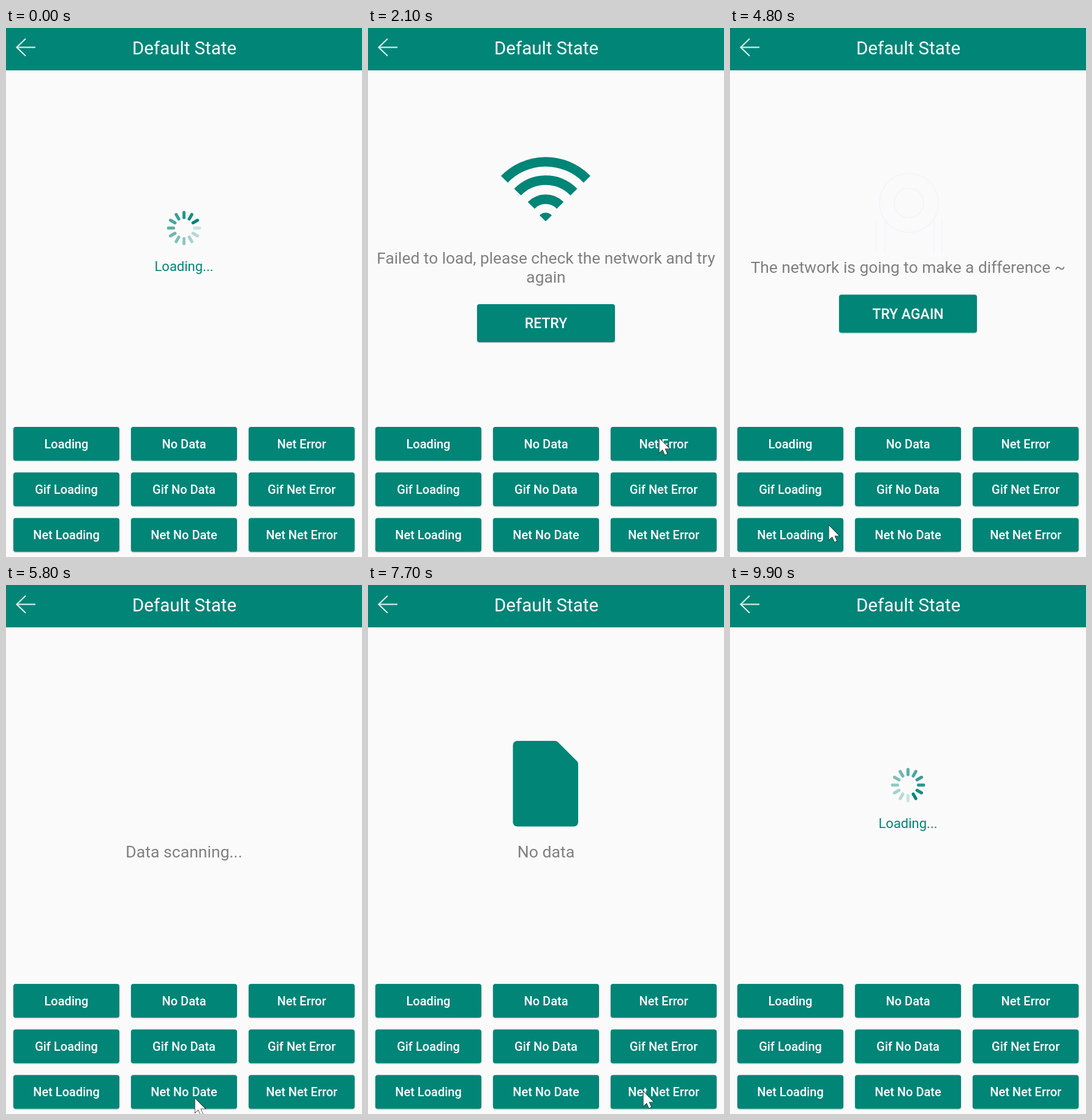
An HTML page with a canvas that plays this animation: 581x862 px, repeating every 10000 ms.

```html
<!DOCTYPE html>
<html lang="en">
<head>
<meta charset="utf-8">
<title>Default State</title>
<style>
html, body { margin: 0; width: 100%; height: 100%; overflow: hidden; background: #fafafa; }
canvas { display: block; }
</style>
</head>
<body>
<canvas id="stage" width="581" height="862"></canvas>
<script>
const ctx = document.getElementById('stage').getContext('2d');
const LOOP = 10000, STEP = 100, CX = 290.5;
const TEAL = '#008577', GRAY = '#808080';

const labels = ['Loading', 'No Data', 'Net Error', 'Gif Loading', 'Gif No Data',
  'Gif Net Error', 'Net Loading', 'Net No Date', 'Net Net Error'];

// The pointer reaches (x, y) at `arrive`, presses at `press`, then the screen changes
const entry = { arrive: 300, press: 300, x: 393, y: 672 };
const presses = [
  { arrive: 700, press: 700, x: 100, y: 670, screen: loading },
  { arrive: 1200, press: 1200, x: 300, y: 670, screen: noData },
  { arrive: 1700, press: 1700, x: 476, y: 668, screen: netError },
  { arrive: 2700, press: 2700, x: 110, y: 758, screen: gifLoading },
  { arrive: 3300, press: 3300, x: 304, y: 747, screen: gifNoData },
  { arrive: 4000, press: 4400, x: 468, y: 745, screen: gifNetError },
  { arrive: 4800, press: 4800, x: 162, y: 810, screen: scanning },
  { arrive: 5800, press: 6500, x: 309, y: 836, screen: noData },
  { arrive: 7700, press: 7900, x: 450, y: 825, screen: netError },
  { arrive: 8800, press: 9000, x: 320, y: 480, screen: loading }
];
const exit = { arrive: 9700, press: 9700, x: 585, y: 498 };
const stops = [entry, ...presses, exit];
const TRAVEL = 600, RESPONSE = 200, RIPPLE = 400;

function text(str, x, y, size, color = GRAY, weight = 400) {
  ctx.font = `${weight} ${size}px Roboto, sans-serif`;
  ctx.textAlign = 'center';
  ctx.fillStyle = color;
  ctx.fillText(str, x, y);
}

function disc(x, y, r, color) {
  ctx.fillStyle = color;
  ctx.beginPath();
  ctx.arc(x, y, r, 0, 2 * Math.PI);
  ctx.fill();
}

function arc(x, y, r, from, to, width, color) {
  ctx.beginPath();
  ctx.arc(x, y, r, from, to);
  ctx.lineWidth = width;
  ctx.strokeStyle = color;
  ctx.stroke();
}

function line(points, width, color) {
  ctx.beginPath();
  points.forEach(([x, y]) => ctx.lineTo(x, y));
  ctx.lineWidth = width;
  ctx.strokeStyle = color;
  ctx.stroke();
}

function button(label, x, y, w, h, size, index, t) {
  ctx.save();
  ctx.beginPath();
  ctx.roundRect(x, y, w, h, 4);
  ctx.shadowColor = 'rgba(0,0,0,.25)';
  ctx.shadowBlur = 2;
  ctx.shadowOffsetY = 1;
  ctx.fillStyle = TEAL;
  ctx.fill();
  ctx.shadowColor = 'transparent';
  const p = (t - presses[index].press) / RIPPLE;
  if (p > 0 && p < 1) {
    ctx.clip();
    disc(x + w / 2, y + h / 2, w * 0.6 * Math.min(1, p * 2), `rgba(255,255,255,${0.22 * (1 - p)})`);
  }
  ctx.restore();
  text(label, x + w / 2, Math.round(y + h / 2 + size * 0.36), size, '#fff', 500);
}

function loading(t) {
  const head = t < LOOP / 2 ? 60 + 0.6 * t : 150 + 0.6 * (t - 9900);
  ctx.save();
  ctx.translate(CX, 326);
  ctx.rotate(head * Math.PI / 180);
  ctx.lineCap = 'round';
  for (let i = 0; i < 12; i++) {
    ctx.globalAlpha = 1 - 0.8 * i / 11;
    line([[0, -17], [0, -25.5]], 5, TEAL);
    ctx.rotate(-Math.PI / 6);
  }
  ctx.restore();
  text('Loading...', CX, 396, 22, TEAL);
}

function noData() {
  const left = 236.5, right = 343, top = 254, bottom = 393.5, fold = 35;
  ctx.fillStyle = TEAL;
  ctx.beginPath();
  ctx.moveTo(CX, top);
  ctx.arcTo(right - fold, top, right, top + fold, 6);
  ctx.arcTo(right, top + fold, right, bottom, 6);
  ctx.arcTo(right, bottom, left, bottom, 7);
  ctx.arcTo(left, bottom, left, top, 7);
  ctx.arcTo(left, top, CX, top, 7);
  ctx.fill();
  text('No data', CX, 444, 26.6);
}

function netError(t) {
  const up = -Math.PI / 2, half = 0.8;
  for (const r of [94, 64, 33]) arc(290, 312, r, up - half, up + half, 15.5, TEAL);
  arc(290, 315, 7, up - half, up + half, 14, TEAL);
  text('Failed to load, please check the network and try', CX, 384, 26.3);
  text('again', CX, 415, 26.3);
  button('RETRY', 178, 450, 225, 62, 23, 9, t);
}

function gifLoading(t) {
  const shift = 30 * Math.sin(2 * Math.PI * (t - 3324) / 1000);
  disc(291 - shift, 323, 30, '#b5c5fb');
  disc(291 + shift, 323, 30, '#e1e7fa');
  text('Loading hard...', CX, 444, 26.6);
}

function gifNoData() {
  text('There is no data ~', CX, 444, 26.3);
}

function gifNetError(t) {
  const faint = '#f3f5fb';
  for (const r of [24, 48]) arc(292, 285, r, 0, 2 * Math.PI, 2, faint);
  for (const x of [239, 253, 333, 346]) line([[x, 312], [x, 366]], 1.5, faint);
  text('The network is going to make a difference ~', CX, 399, 26.3);
  button('TRY AGAIN', 178, 434.5, 225, 62, 23, 9, t);
}

function scanning() {
  text('Data scanning...', CX, 444, 26.6);
}

function drawPointer(t) {
  const i = stops.findIndex(stop => stop.press > t);
  if (i < 1) return;
  const from = stops[i - 1], to = stops[i];
  const depart = Math.max(from.press + 100, to.arrive - TRAVEL);
  const p = Math.min(1, Math.max(0, (t - depart) / (to.arrive - depart)));
  ctx.save();
  ctx.translate(from.x + (to.x - from.x) * p - 0.5, from.y + (to.y - from.y) * p + 0.5);
  ctx.scale(1.42, 1.42);
  ctx.fillStyle = '#fff';
  line([[0, 0], [0, 16.5], [3.8, 13], [6.4, 19], [9, 17.8], [6.4, 12], [11.8, 12], [0, 0]], 0.8, '#000');
  ctx.fill();
  ctx.restore();
}

function draw(t) {
  ctx.fillStyle = '#fafafa';
  ctx.fillRect(0, 0, 581, 862);
  ctx.fillStyle = TEAL;
  ctx.fillRect(0, 0, 581, 69);
  line([[48, 31.5], [17.5, 31.5]], 2.2, '#d8ece9');
  line([[32, 17.5], [17.5, 31.5], [32, 45.5]], 2.2, '#d8ece9');
  text('Default State', 291, 42.5, 29.5, '#fff');

  const last = presses.findLast(({ press }) => t >= press + RESPONSE);
  (last ? last.screen : loading)(t);

  labels.forEach((label, i) =>
    button(label, 12 + 192 * (i % 3), 650 + 74.3 * Math.floor(i / 3), 173, 55, 20, i, t));
  drawPointer(t);
}

function tick() {
  draw(Math.floor(performance.now() % LOOP / STEP) * STEP);
  requestAnimationFrame(tick);
}
tick();
</script>
</body>
</html>
```
